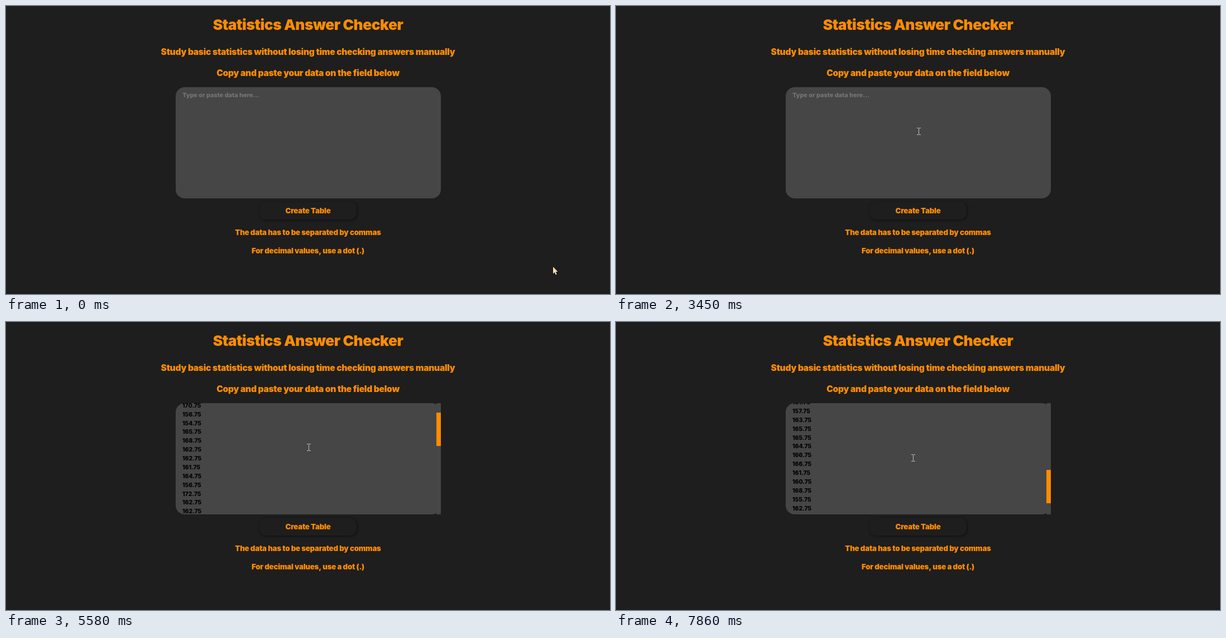
Write an HTML page with a canvas that moves like this. It is 1082 px wide and 518 px high and loops after 8000 ms.

```html
<!DOCTYPE html>
<html lang="en">
<head>
<meta charset="utf-8">
<title>Statistics Answer Checker</title>
<style>
  html, body { margin: 0; width: 100%; height: 100%; overflow: hidden; background: #1e1e1e; }
  canvas { display: block; width: 1082px; height: 518px; }
</style>
</head>
<body>
<canvas id="stage" width="1082" height="518"></canvas>
<script>
const ctx = document.getElementById('stage').getContext('2d');
const LOOP = 8000, PASTE = 3540, BLINK = 530;
const BG = '#1e1e1e', ORANGE = '#ff8c00', FIELD = '#464646';
const BOX = { x: 304, y: 146, w: 475, h: 200, r: 16 };
const BAR = { x: 771, w: 8, thumb: 60 };
const ROWS = 40, ROW = 15.87, MAX_SCROLL = 463;
const PASTED_SCROLL = 458;

function seeded(seed) {
  return () => (seed = (seed * 16807) % 2147483647) / 2147483647;
}

// Heights between 151.75 and 174.75, most of them near the middle
const random = seeded(162);
const values = Array.from({ length: ROWS }, () =>
  (151.75 + Math.floor(12 * (random() + random()))).toFixed(2));

const linear = p => p;
const smooth = p => (1 - Math.cos(Math.PI * p)) / 2;
const speedUp = p => p ** 1.7;
const slowDown = p => 1 - (1 - p) ** 1.4;

function progress(t, start, end, ease = linear) {
  return ease(Math.min(1, Math.max(0, (t - start) / (end - start))));
}

function scrollAt(t) {
  if (t < PASTE) return 0;
  if (t < 6500) {
    const rest = 58;
    return PASTED_SCROLL - (PASTED_SCROLL - rest) * progress(t, 4430, 5580)
      - rest * progress(t, 5860, 6040, smooth);
  }
  return 397 * progress(t, 6970, 7860);
}

function pointerAt(t) {
  const out = progress(t, 0, 810, speedUp);
  const glide = progress(t, 810, 1530, slowDown);
  const settle = progress(t, 1640, 1840, smooth);
  const drift = progress(t, 6830, 7860);
  return [
    980 - 122 * out - 282 * glide - 34 * settle - 10 * drift,
    469 - 85 * out - 133 * glide - 26 * settle + 19 * drift
  ].map(Math.round);
}

function text(str, x, y, size, color = ORANGE, align = 'center', weight = 900) {
  ctx.font = `${weight} ${size}px Inter, "Open Sans", sans-serif`;
  ctx.letterSpacing = weight === 900 ? `${-0.018 * size}px` : '0px';
  ctx.fillStyle = color;
  ctx.textAlign = align;
  ctx.fillText(str, x, y);
}

function roundBox(x, y, w, h, r, color) {
  ctx.fillStyle = color;
  ctx.beginPath();
  ctx.roundRect(x, y, w, h, r);
  ctx.fill();
}

function drawPage() {
  ctx.fillStyle = BG;
  ctx.fillRect(0, 0, 1082, 518);
  text('Statistics Answer Checker', 541, 43, 26.3);
  text('Study basic statistics without losing time checking answers manually', 541, 87.5, 15.6);
  text('Copy and paste your data on the field below', 541, 125.5, 15.6);

  ctx.save();
  ctx.shadowColor = 'rgba(0,0,0,0.55)';
  ctx.shadowBlur = 4;
  ctx.shadowOffsetX = ctx.shadowOffsetY = 1;
  roundBox(454, 352, 174, 32, 12, BG);
  ctx.restore();
  text('Create Table', 541, 373, 13.3);
  text('The data has to be separated by commas', 541, 412, 13.3);
  text('For decimal values, use a dot (.)', 541, 444.5, 13.3);
}

function caretOn(t) {
  if (t < 2430) return false;
  const since = t < PASTE ? t - 2430 : t - PASTE;
  return Math.floor(since / BLINK) % 2 === 0;
}

function drawRows(scroll) {
  values.forEach((value, i) => {
    text(value, 316, 164.2 + i * ROW - scroll, 10.4, '#000', 'left', 800);
  });
}

function drawScrollbar(scroll) {
  const top = scroll / MAX_SCROLL * (BOX.h - BAR.thumb);
  ctx.fillStyle = FIELD;
  ctx.fillRect(BAR.x, BOX.y, BAR.w, BOX.h);
  ctx.fillStyle = ORANGE;
  ctx.fillRect(BAR.x, BOX.y + Math.floor(top), BAR.w, BAR.thumb);
}

function drawField(t) {
  const pasted = t >= PASTE;
  const scroll = Math.round(scrollAt(t));
  roundBox(BOX.x, BOX.y, BOX.w, BOX.h, BOX.r, FIELD);

  ctx.save();
  ctx.beginPath();
  ctx.rect(BOX.x, BOX.y, BOX.w, BOX.h);
  ctx.clip();
  if (pasted) {
    drawRows(scroll);
    drawScrollbar(scroll);
  } else {
    text('Type or paste data here...', 316, 163.7, 10.9, '#757575', 'left', 800);
  }
  if (caretOn(t)) {
    const line = pasted ? ROWS : 0;
    ctx.fillStyle = '#000';
    ctx.fillRect(316, Math.round(153 + line * ROW - scroll), 1, 15);
  }
  ctx.restore();
}

function drawArrow(x, y) {
  ctx.save();
  ctx.translate(x, y);
  const shape = new Path2D('M0 0V12.5L2.8 10L4.8 14.4L6.7 13.5L4.8 9.2L8.4 8.8Z');
  ctx.strokeStyle = '#111';
  ctx.lineWidth = 1.2;
  ctx.stroke(shape);
  ctx.fillStyle = '#ffdcb4';
  ctx.fill(shape);
  ctx.restore();
}

function drawBeam(x, y) {
  ctx.fillStyle = '#c4c4c4';
  ctx.fillRect(x, y - 5, 1, 11);
  for (const dy of [-6, 6]) {
    ctx.fillRect(x - 3, y + dy, 3, 1);
    ctx.fillRect(x + 1, y + dy, 3, 1);
  }
}

function drawPointer(t) {
  const [x, y] = pointerAt(t);
  const inField = x < BOX.x + BOX.w && y < BOX.y + BOX.h;
  (inField ? drawBeam : drawArrow)(x, y);
}

const start = performance.now();

function frame() {
  const t = (performance.now() - start) % LOOP;
  drawPage();
  drawField(t);
  drawPointer(t);
  requestAnimationFrame(frame);
}

frame();
</script>
</body>
</html>
```
